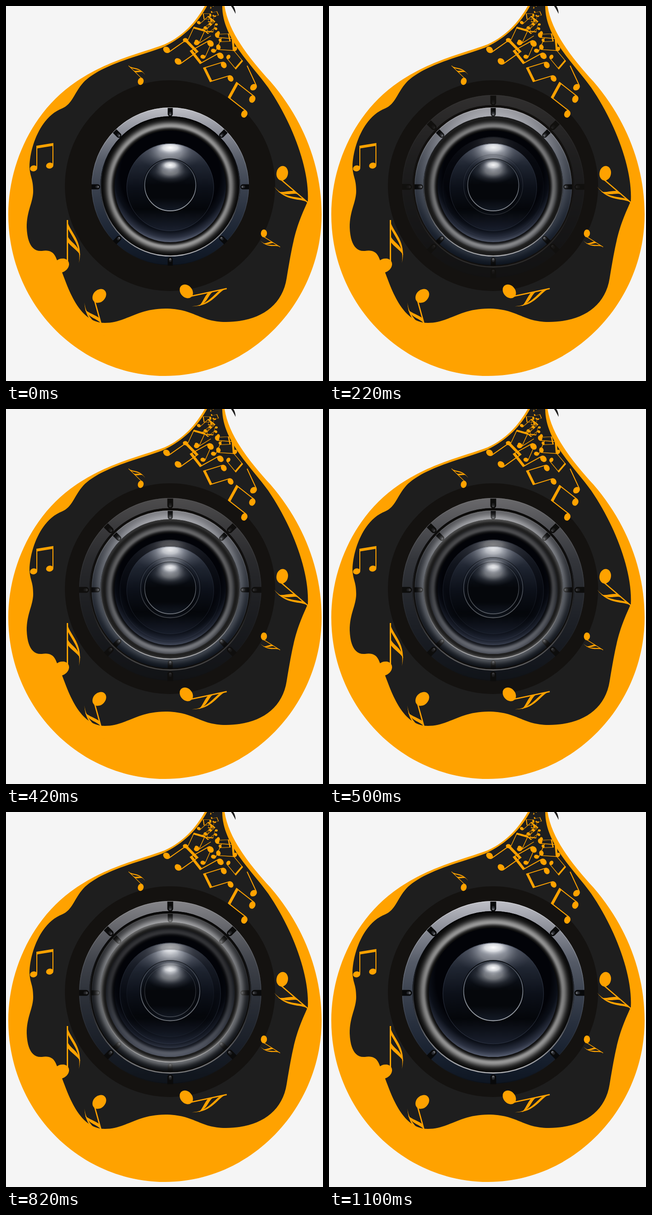
These frames come from a looping animation (689x813 px, 1200 ms). An HTML page:

```html
<!DOCTYPE html>
<html lang="en">
<head>
<meta charset="utf-8">
<title>Speaker</title>
<style>
html, body { margin: 0; width: 100%; height: 100%; overflow: hidden; background: #f5f5f5; }
svg { display: block; }
</style>
</head>
<body>
<svg width="689" height="813" viewBox="0 0 689 813">
  <defs>
    <g id="gradients"></g>
    <clipPath id="coneClip"><circle cy="2" r="95"/></clipPath>
    <clipPath id="domeClip"><circle cy="-2.5" r="55"/></clipPath>

    <g id="speaker">
      <circle r="171" fill="url(#rim)"/>
      <circle r="170.4" fill="none" stroke="url(#edge)" stroke-opacity=".7" stroke-width="1.2"/>
      <g id="slots"></g>
      <circle r="152" fill="#050506"/>
      <circle r="150" fill="url(#tube)"/>
      <circle r="150" fill="url(#shade)"/>
      <circle r="151" fill="none" stroke="url(#lip)" stroke-width="2.2"/>
      <circle r="121" fill="url(#bowl)"/>
      <g clip-path="url(#coneClip)">
        <circle cy="2" r="95" fill="url(#cone)"/>
        <ellipse cy="-72" rx="72" ry="38" fill="url(#glow)" opacity=".5"/>
        <ellipse cy="-84" rx="48" ry="22" fill="url(#glow)"/>
      </g>
      <circle cy="2" r="94.5" fill="none" stroke="#343b4b" stroke-opacity=".7"/>
      <circle cy="-2.5" r="58" fill="#04060a"/>
      <circle cy="-2.5" r="56" fill="url(#dome)"/>
      <g clip-path="url(#domeClip)">
        <ellipse cy="-34" rx="50" ry="28" fill="url(#glow)" opacity=".55"/>
        <ellipse cy="-46" rx="33" ry="17" fill="url(#glow)"/>
      </g>
      <circle cy="-2.5" r="55.6" fill="none" stroke="url(#band)" stroke-width="1.8"/>
    </g>

    <!-- Two flags; the origin is the stem tip -->
    <g id="flagged">
      <path d="M-1.5-2H1.5V100H-1.5Z"/>
      <path d="M0 0C3 22 36 42 25 91C30 56 12 38 0 15Z"/>
      <path d="M0 31C4 46 24 50 28 74C20 62 9 57 0 45Z"/>
      <ellipse rx="18.5" ry="14.5" transform="translate(-14 97) rotate(-30)"/>
    </g>
    <!-- The origin is the left head -->
    <g id="single">
      <ellipse rx="8" ry="6.4" transform="rotate(-15)"/>
      <path d="M6-1V-48H8V-1Z"/>
    </g>
    <g id="beamed">
      <use href="#single"/>
      <use href="#single" x="35" y="-6"/>
      <path d="M6-49L43-55V-49L6-43Z"/>
    </g>
  </defs>

  <path fill="#ffa200" d="M432 0C412 35 385 65 345 83C290 104 215 118 140 173C55 236 5 345 5 452
    C5 646 158 802 346 802C534 802 686 640 686 452C686 345 645 245 575 164C530 115 484 58 475 0Z"/>
  <path fill="#1e1e1e" d="M437 0C418 35 388 68 340 90C285 110 205 128 168 166C148 188 145 212 122 222
    C75 240 52 305 51 348C52 372 60 375 59 405C57 430 45 445 45 480C46 510 55 533 78 531
    C105 526 108 545 113 556C130 590 150 687 215 687C260 687 285 656 346 656C410 656 420 685 478 685
    C545 685 600 655 610 590C625 500 630 480 656 423C660 350 620 250 570 177C535 128 470 70 470 0Z"/>
  <path fill="#1e1e1e" d="M489 0C493 5 495 10 499 17C499 10 497 4 494 0Z"/>
  <circle cx="356.5" cy="389.5" r="228.5" fill="#141210"/>
  <g id="notes" fill="#ffa200"></g>
  <use href="#speaker" transform="translate(357 391)"/>
  <use id="loud" href="#speaker" transform="translate(357 391) scale(1.158)" opacity="0"/>
</svg>
<script>
const $ = id => document.getElementById(id);

// Evenly spaced colours between the offsets from and to
function stops(colors, from = 0, to = 1) {
  return colors.map((c, i) =>
    `<stop offset="${from + (to - from) * i / (colors.length - 1)}" stop-color="${c}"/>`).join('');
}
const down = (id, colors) =>
  `<linearGradient id="${id}" gradientTransform="rotate(90)">${stops(colors)}</linearGradient>`;
const radial = (id, y, r, inner) =>
  `<radialGradient id="${id}" gradientUnits="userSpaceOnUse" cx="0" cy="${y}" r="${r}">${inner}</radialGradient>`;

// Grey of the rubber ring: one highlight, falling off faster inwards
function tubeGrey(r) {
  const width = r < .872 ? .034 : .062;
  const g = Math.round(8 + 150 * Math.exp(-(((r - .872) / width) ** 2)));
  return `rgb(${g},${g},${g})`;
}
const tube = Array.from({ length: 15 }, (_, i) => tubeGrey(.79 + .015 * i));

$('gradients').innerHTML =
  down('rim', ['#bfc0c7', '#868993', '#555b67', '#3c4350', '#28303e', '#182130', '#0e1622']) +
  down('edge', ['#e4e4e8', '#59606c', '#080c12']) +
  down('lip', ['#000', '#0d0f13', '#3f434b', '#b5b6ba']) +
  down('shade', ['#0000', '#0003', '#0000']) +
  down('cone', ['#4a4f5c', '#1f2531', '#0c1019', '#04060a', '#1a202e']) +
  down('dome', ['#0c1018', '#0d121b', '#05070b', '#05070b', '#151b27']) +
  down('band', ['#39404c', '#656c77', '#a2a7ae']) +
  down('screw', ['#17181b', '#313338', '#85888f']) +
  radial('tube', 0, 150, stops(tube, .79, 1)) +
  radial('bowl', -25, 150, stops(['#020308', '#0b0f18', '#2b3141', '#687084'], .72, 1)) +
  `<radialGradient id="glow">${stops(['#fff', '#eceef2cc', '#9aa0ae4d', '#6a708000'])}</radialGradient>`;

const put = (id, x, y, turn, size) =>
  `<use href="#${id}" transform="translate(${x} ${y}) rotate(${turn}) scale(${size})"/>`;

let notes =
  put('flagged', 133.5, 466, 0, 1) +
  put('flagged', 656, 426, 130.5, .86) +
  put('flagged', 478, 613, 78, .88) +
  put('flagged', 214, 716, 164.5, .9) +
  put('flagged', 595, 522, 122, .46) +
  put('flagged', 267, 130, -46, .43) +
  put('beamed', 60, 352, 0, 1) +
  put('beamed', 349, 95, 55, 1) +
  put('beamed', 488, 157, -107, .92) +
  put('beamed', 518, 234, -52, 1.03) +
  put('beamed', 466, 108, -119, .97) +
  put('beamed', 498, 93, 140, .64) +
  put('beamed', 459, 63, 94, .74) +
  put('beamed', 390, 74, 25, .7) +
  put('beamed', 419, 36, 48, .52) +
  put('single', 538, 176, -25, 1) +
  put('single', 428, 110, 24, .68) +
  put('single', 451, 97, 24, .68) +
  put('single', 415, 78, 58, .68);

// Small notes fill the neck, shrinking towards the top
let seed = 7;
const random = () => (seed = seed * 16807 % 2147483647) / 2147483647;
for (let y = 4; y < 66; y += 9) {
  const x = 450 + (random() - .5) * (8 + y * .5);
  notes += put('beamed', x, y, random() * 360, .18 + y * .005);
}
$('notes').innerHTML = notes;

let slots = '';
for (let a = 0; a < 360; a += 45) {
  slots += `<g transform="translate(0 1) rotate(${a}) translate(0 -171)">
    <path d="M-5.5 0H5.5V13A5.5 5.5 0 0 1-5.5 13Z" fill="#08090a"/>
    <rect x="-2.5" y="8" width="5" height="8" rx="2.5" fill="url(#screw)"/></g>`;
}
$('slots').innerHTML = slots;

// The larger speaker fades in over the smaller one in equal steps
const LOOP = 1200, STEP = 200;
function draw() {
  const t = performance.now() % LOOP;
  $('loud').setAttribute('opacity', Math.round(t / STEP) * STEP / LOOP);
  requestAnimationFrame(draw);
}
draw();
</script>
</body>
</html>
```
